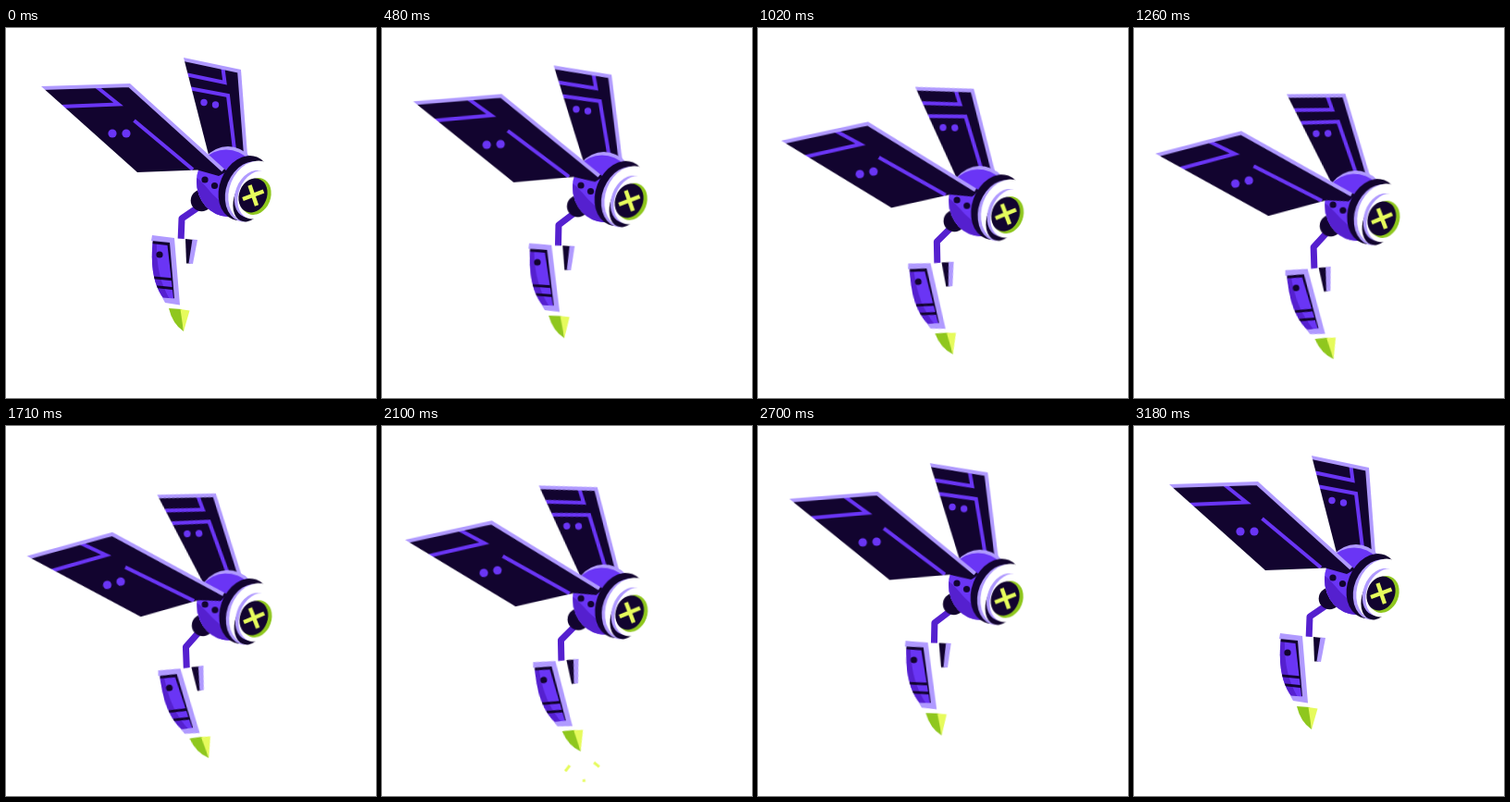
An HTML page for the animation above (3.21 s loop, 400 by 400 pixels).

```html
<!DOCTYPE html>
<html lang="en">
<head>
<meta charset="utf-8">
<title>Hovering drone</title>
<style>
  html, body { margin: 0; width: 100%; height: 100%; overflow: hidden; background: #fff; }
  svg { display: block; width: 100%; height: 100%; }
  :root {
    --ink: #12042f; --violet: #6a35f5; --deep: #5520cf;
    --lav: #b09aff; --lime: #e6fb5c; --green: #8fc71e;
  }
  .ink { fill: var(--ink); }
  .violet { fill: var(--violet); }
  .deep { fill: var(--deep); }
  .lav { fill: var(--lav); }
  .white { fill: #fff; }
  .lime { fill: var(--lime); }
  .green { fill: var(--green); }
  .edge, .trace, .pipe, .cross, .spark { fill: none; }
  .edge { stroke: var(--lav); stroke-width: 8; }
  .trace { stroke: var(--violet); stroke-width: 4; }
  .cross { stroke: var(--lime); stroke-width: 4.4; }
  .pipe { stroke: var(--deep); stroke-width: 7; stroke-linejoin: round; }

  /* the easing applies to each half of the loop */
  .move { animation: move 3210ms cubic-bezier(.39, 0, .6, 1) infinite; }
  .lag { animation: lag 3210ms cubic-bezier(.39, 0, .6, 1) infinite; }
  .pipe { animation: bend 3210ms cubic-bezier(.39, 0, .6, 1) infinite; }
  .spark { stroke: var(--lime); stroke-width: 3; animation: spark 3210ms linear infinite; }

  .hover { --pose: translate(0px, 28.5px); }
  .left { --pose: rotate(-14deg); transform-origin: 236px 152px; }
  .right { --pose: rotate(-13.4deg); transform-origin: 240px 163px; }
  .body { --pose: rotate(-2.5deg); transform-origin: 236px 160px; }
  .drop { --pose: translate(0px, 41px); }
  .swing { --pose: translate(6.6px, 0px) rotate(-12deg); transform-origin: 158px 225px; }

  @keyframes move {
    0%, 100% { transform: none; }
    48.6% { transform: var(--pose); }
  }
  @keyframes lag {
    0%, 100% { transform: none; }
    52.3% { transform: var(--pose); }
  }
  @keyframes bend {
    0%, 100% { d: path("M209 193L190 206L189 232"); }
    48.6% { d: path("M209 223L194.5 239.5L195.6 268"); }
  }
  /* two short bursts under the tip */
  @keyframes spark {
    0%, 3.7% { stroke-dasharray: 0 0 0 20; opacity: 0; }
    3.8% { stroke-dasharray: 0 0 0 20; opacity: 1; }
    7.8% { stroke-dasharray: 0 2 5 20; opacity: 1; }
    9.8% { stroke-dasharray: 0 5.5 4 20; opacity: 1; }
    12.3% { stroke-dasharray: 0 10 0 20; opacity: 1; }
    12.4%, 58.8% { stroke-dasharray: 0 0 0 20; opacity: 0; }
    58.9% { stroke-dasharray: 0 0 0 20; opacity: 1; }
    63% { stroke-dasharray: 0 2 5 20; opacity: 1; }
    65.4% { stroke-dasharray: 0 5.5 4 20; opacity: 1; }
    68.3% { stroke-dasharray: 0 10 0 20; opacity: 1; }
    68.4%, 100% { stroke-dasharray: 0 0 0 20; opacity: 0; }
  }
</style>
</head>
<body>
<svg viewBox="0 0 400 400">
  <defs>
    <clipPath id="shell"><ellipse cx="240" cy="166" rx="34" ry="38"/></clipPath>
    <clipPath id="leftWing"><path d="M38 63L134 60L239 155L230 160L207 153.500L142 156Z"/></clipPath>
    <clipPath id="rightWing"><path d="M192 32L254 45L261 137L219 137Z"/></clipPath>
    <clipPath id="pod"><path d="M159 229L180 231L186 294L170 292C162 281 155 262 159 229Z"/></clipPath>
  </defs>

  <g class="move hover">
    <g class="move right" clip-path="url(#rightWing)">
      <path class="ink" d="M192 32H262V138H192Z"/>
      <path class="trace" d="M196 50.500L236.500 59L234 40M200 65.500L240 73L247.500 136"/>
      <path class="edge" d="M192 32L254 45L261 137"/>
      <circle class="violet" cx="214" cy="80.500" r="3.700"/>
      <circle class="violet" cx="226.500" cy="83" r="3.700"/>
    </g>
  </g>

  <path class="pipe" d="M209 193L190 206L189 232"/>

  <g class="move hover">
    <g class="move body">
      <circle class="ink" cx="211.500" cy="186.500" r="11.800"/>
      <g clip-path="url(#shell)">
        <path class="lav" d="M200 120H280V210H200Z"/>
        <ellipse class="violet" cx="238" cy="171" rx="36" ry="39.500"/>
        <path class="deep" d="M200 160C214 160 222 190 250 196V210H200Z"/>
      </g>
      <circle class="ink" cx="215" cy="164" r="3.600"/>
      <circle class="ink" cx="225.500" cy="170.500" r="3.600"/>

      <g transform="rotate(22 258 173)">
        <ellipse class="ink" cx="258" cy="173" rx="27" ry="36"/>
      </g>
      <g transform="rotate(22 264 177)">
        <ellipse class="lav" cx="264" cy="177" rx="26" ry="34"/>
      </g>
      <g transform="rotate(22 268 177)">
        <ellipse class="white" cx="268" cy="177" rx="26.500" ry="34.500"/>
      </g>
      <g transform="rotate(22 264 184)">
        <ellipse class="ink" cx="264" cy="184" rx="17" ry="26.500"/>
      </g>
      <g transform="rotate(22 267 179.500)">
        <ellipse class="lav" cx="267" cy="179.500" rx="19" ry="26.500"/>
      </g>
      <g transform="rotate(22 271 180.500)">
        <ellipse class="white" cx="271" cy="180.500" rx="19.500" ry="27"/>
      </g>
      <g transform="rotate(22 270 182)">
        <ellipse class="green" cx="270" cy="182" rx="16" ry="20.500"/>
      </g>
      <g transform="rotate(22 267 181)">
        <ellipse class="ink" cx="267" cy="181" rx="15" ry="19"/>
      </g>
      <path class="cross" d="M256 185L278.500 176.500M263.500 170L271 192"/>
    </g>

    <g class="move left" clip-path="url(#leftWing)">
      <path class="ink" d="M30 55H245V165H30Z"/>
      <path class="trace" d="M58 85L121.500 82.500L96 62M138.500 100L202 153"/>
      <path class="edge" d="M36 63L134 60L236 152.300"/>
      <circle class="violet" cx="115" cy="114" r="4.600"/>
      <circle class="violet" cx="130" cy="114" r="4.600"/>
    </g>
  </g>

  <g class="move drop">
    <g class="lag swing">
      <path class="white" d="M178 227L206 229L198 306L176 302Z"/>
      <g clip-path="url(#pod)">
        <path class="violet" d="M150 225H190V300H150Z"/>
        <path class="deep" d="M150 225H163C162 255 166 275 178 295H150Z"/>
        <path class="ink" d="M156 228L184 229L190 296L181 292L174.500 235L156 233Z"/>
        <path d="M156 269.500L182 272M156 279L184 282" fill="none" stroke="var(--ink)" stroke-width="2.800"/>
      </g>
      <circle class="ink" cx="166" cy="245" r="3.600"/>
      <path class="lav" d="M158 224L182 227L188 299.500L172 297L169 291.500L182 292.500L177 232L157 230Z"/>
      <path class="ink" d="M194 228L203 229L199.500 254.500H195Z"/>
      <path class="lav" d="M201.500 228.500L207 229L202 255L197.500 254.500Z"/>
      <path class="green" d="M176 303L190 304L192 328Q180 320 176 303Z"/>
      <path class="lime" d="M188.500 304L198.500 305.500L192 328Z"/>
      <g transform="translate(192 328)">
        <path class="spark" pathLength="10" d="M-6 5.300L-20.800 18.800"/>
        <path class="spark" pathLength="10" d="M5.200 6.100L17.500 20.600"/>
        <path class="spark" pathLength="10" d="M-1.700 26L-2 33.500"/>
      </g>
    </g>
  </g>
</svg>
</body>
</html>
```
